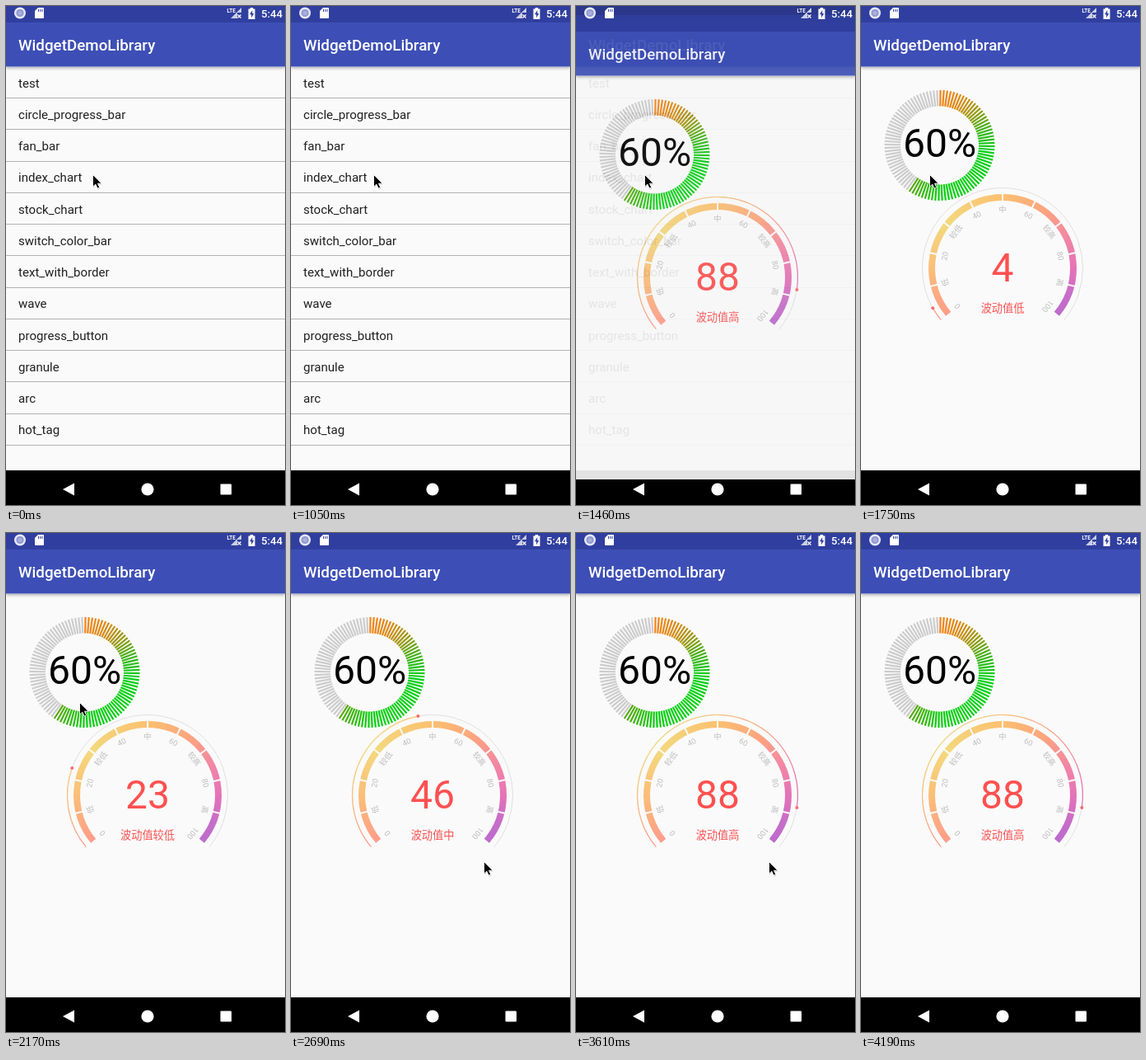
Recreate the animation shown at these times as an HTML page with a canvas. Size 339 by 605 pixels, loop 5130 ms.

```html
<!DOCTYPE html>
<html lang="en">
<head>
<meta charset="utf-8">
<title>Custom views</title>
<style>
html, body { margin: 0; width: 100%; height: 100%; overflow: hidden; background: #000; }
#stage { position: relative; width: 339px; height: 605px; overflow: hidden; background: #000;
  font-family: Roboto, "Noto Sans CJK SC", sans-serif; }
.screen { position: absolute; inset: 0; isolation: isolate; background: linear-gradient(#fafafa 563px, #000 563px); }
.screen::before { content: ""; position: absolute; width: 339px; height: 20px; background: #303f9f; z-index: 1; }
.bar { position: absolute; top: 20px; width: 324px; height: 53px; padding-left: 15px; background: #3d4fb6;
  color: #fff; font: 500 18.8px/56px Roboto, sans-serif;
  box-shadow: 0 1px 0 #8f99d0, 0 2px 4px rgba(0,0,0,.35); }
.row { position: absolute; left: 15px; font-size: 15.07px; line-height: 38px; color: #212121; }
.line { position: absolute; width: 339px; height: 1px; background: #b2b2b2; }
canvas, svg { position: absolute; left: 0; top: 0; width: 339px; height: 605px; }
</style>
</head>
<body>
<div id="stage">
  <div class="screen" id="list"><div class="bar">WidgetDemoLibrary</div></div>
  <div class="screen" id="detail"><div class="bar">WidgetDemoLibrary</div><canvas id="cv"></canvas></div>
  <svg viewBox="0 0 339 605" fill="#fff" font-family="Roboto, sans-serif">
    <circle cx="17" cy="8.5" r="7" fill="#e6e8f7"/>
    <circle cx="17" cy="8.5" r="4.6" fill="#8f98d0"/>
    <circle cx="17" cy="8.5" r="2.6" fill="#a9b0dc"/>
    <path d="M39 2h6q1 0 1 1v11q0 1-1 1h-9q-1 0-1-1V6z"/>
    <path d="M39.5 4v3M41.8 4v3M44 4v3" stroke="#303f9f"/>
    <text x="268.5" y="7.5" font-size="6.3" font-weight="700">LTE</text>
    <path d="M286 2v6h-5v7h-8z" opacity=".75"/>
    <path d="M281.5 10.5l4 4m0-4l-4 4" stroke="#fff" stroke-width="1.2"/>
    <path d="M294.5 3.5h2.300v-1.500h3.400v1.500h2.300v12.500h-8z"/>
    <path d="M299.3 5l-3.300 5.300h2.100v4l3.200-5.300h-2z" fill="#303f9f"/>
    <text x="310" y="13.5" font-size="13.2" font-weight="500">5:44</text>
    <path d="M69 586l14-7.500v15z"/>
    <circle cx="172" cy="586" r="7.6"/>
    <rect x="260.5" y="579.5" width="13.500" height="13" rx="1"/>
    <g id="cursor">
      <path d="M1 2v14.500l3.400-3.200 2.400 5.200 2.600-1.200-2.300-4.900h4.700z" fill="#000" opacity=".18"/>
      <path d="M.5.5v14.700l3.300-3.100 2.300 5 2.600-1.200-2.200-4.700h4.600z" fill="#000" stroke="#fff" stroke-width=".9"/>
    </g>
  </svg>
</div>
<script>
const $ = id => document.getElementById(id);
const LOOP = 5130, START = 1399, STEP = 58.16, RAD = Math.PI / 180;
const FONT = 'Roboto, "Noto Sans CJK SC", sans-serif';
const items = ['test', 'circle_progress_bar', 'fan_bar', 'index_chart', 'stock_chart', 'switch_color_bar',
  'text_with_border', 'wave', 'progress_button', 'granule', 'arc', 'hot_tag'];
const levels = ['低', '较低', '中', '较高', '高'];

items.forEach((name, i) => {
  const add = (cls, top, text) => {
    const el = document.createElement('div');
    el.className = cls;
    el.style.top = top + 'px';
    el.textContent = text;
    $('list').append(el);
  };
  add('row', 74.5 + i * 38.27, name);
  add('line', Math.round(111 + i * 38.27), '');
});

// time, x, y of the pointer tip
const path = [[0, 105, 204], [1050, 100, 204], [1110, 89, 204], [1160, 83, 204],
  [2100, 86, 204], [2160, 89, 205], [2230, 103, 202], [2290, 148, 261], [2350, 206, 351], [2410, 234, 398],
  [3970, 236, 421], [4020, 244, 459], [4080, 257, 509], [4140, 276, 561], [4190, 300, 620]];

const ctx = $('cv').getContext('2d'), dpr = window.devicePixelRatio || 1;
$('cv').width = 339 * dpr;
$('cv').height = 605 * dpr;

function conic(start, x, y, stops) {
  const g = ctx.createConicGradient(start * RAD, x, y);
  stops.forEach(([p, c]) => g.addColorStop(p, c));
  return g;
}
const ringPaint = conic(-91, 95.5, 169, [[0, '#f5841a'], [.07, '#dc8a12'], [.14, '#929c10'], [.2, '#3cb418'],
  [.27, '#08d018'], [.5, '#08d010'], [.6, '#5aa80c']]);
// 100 units of the dial span 260 degrees
const dialPaint = conic(140, 172, 318, [[0, '#ff9c8a'], [.15, '#fbbd78'], [.3, '#f3d97e'], [.5, '#fbc070'],
  [.64, '#fda47f'], [.76, '#f184a6'], [.85, '#e472b8'], [.93, '#c66dc9'], [1, '#bd6bcc']]
  .map(([p, c]) => [p * 260 / 360, c]));

function text(str, x, y, size, color) {
  ctx.font = size + 'px ' + FONT;
  ctx.fillStyle = color;
  ctx.fillText(str, x, y);
}

function stroke(color, width, build) {
  ctx.beginPath();
  build();
  ctx.strokeStyle = color;
  ctx.lineWidth = width;
  ctx.stroke();
}

function spoke(x, y, deg, r1, r2) {
  const c = Math.cos(deg * RAD), s = Math.sin(deg * RAD);
  ctx.moveTo(x + r1 * c, y + r1 * s);
  ctx.lineTo(x + r2 * c, y + r2 * s);
}

function drawRing() {
  const ticks = (from, to) => () => {
    for (let i = from; i < to; i++) spoke(95.5, 169, i * 3.6 - 89.1, 47.5, 67);
  };
  stroke('#ccc', 2.2, ticks(60, 100));
  stroke(ringPaint, 2.2, ticks(0, 60));
  text('60%', 95.5, 183, 48, '#000');
}

function drawDial(v) {
  const x = 172, y = 318, angle = n => 140 + n * 2.6;
  const arc = (r, n) => () => ctx.arc(x, y, r, angle(0) * RAD, angle(n) * RAD);
  stroke('#dfdfdf', 1, arc(97.5, 100));
  stroke(dialPaint, 1.2, arc(97.5, v));
  stroke(dialPaint, 8, arc(86, 100));
  stroke('#fafafa', 2, () => {
    for (let n = 10; n < 100; n += 10) spoke(x, y, angle(n), 81, 91);
  });
  for (let n = 0; n <= 100; n += 10) {
    ctx.save();
    ctx.translate(x, y);
    ctx.rotate((angle(n) + 90) * RAD);
    text(n % 20 ? levels[(n - 10) / 20] : n, 0, -68.5, 9.4, '#bdbdbd');
    ctx.restore();
  }
  const a = angle(v) * RAD;
  ctx.beginPath();
  ctx.arc(x + 97.5 * Math.cos(a), y + 97.5 * Math.sin(a), 2, 0, 7);
  ctx.fillStyle = '#fb6a72';
  ctx.fill();
  text(v, x, 334, 48, '#ff5050');
  text('波动值' + levels[Math.min(4, Math.floor(v / 20))], x, 370.5, 13.18, '#ff5050');
}

function draw(t) {
  const k = Math.floor((t - START) / STEP);
  const ms = 15 + 74 * k;
  const left = span => Math.max(0, 1 - ms / span);
  const open = k >= 0;
  $('detail').style.visibility = open ? 'visible' : 'hidden';
  $('list').style.opacity = open ? .7 + .3 * left(217) : 1;
  if (open) {
    $('detail').style.opacity = 1 - left(200) ** 4;
    $('detail').style.transform = `translateY(${Math.round(48.4 * left(350) ** 5)}px)`;
    ctx.setTransform(dpr, 0, 0, dpr, 0, 0);
    ctx.clearRect(0, 0, 339, 605);
    ctx.textAlign = 'center';
    drawRing();
    drawDial(k < 5 ? 88 : Math.min(88, Math.floor(2.63 * (k - 4.22))));
  }
  const [, x, y] = path.filter(p => p[0] <= t).pop();
  $('cursor').setAttribute('transform', `translate(${x} ${y})`);
}

const t0 = performance.now();
function loop() {
  draw((performance.now() - t0) % LOOP);
  requestAnimationFrame(loop);
}
loop();
</script>
</body>
</html>
```
